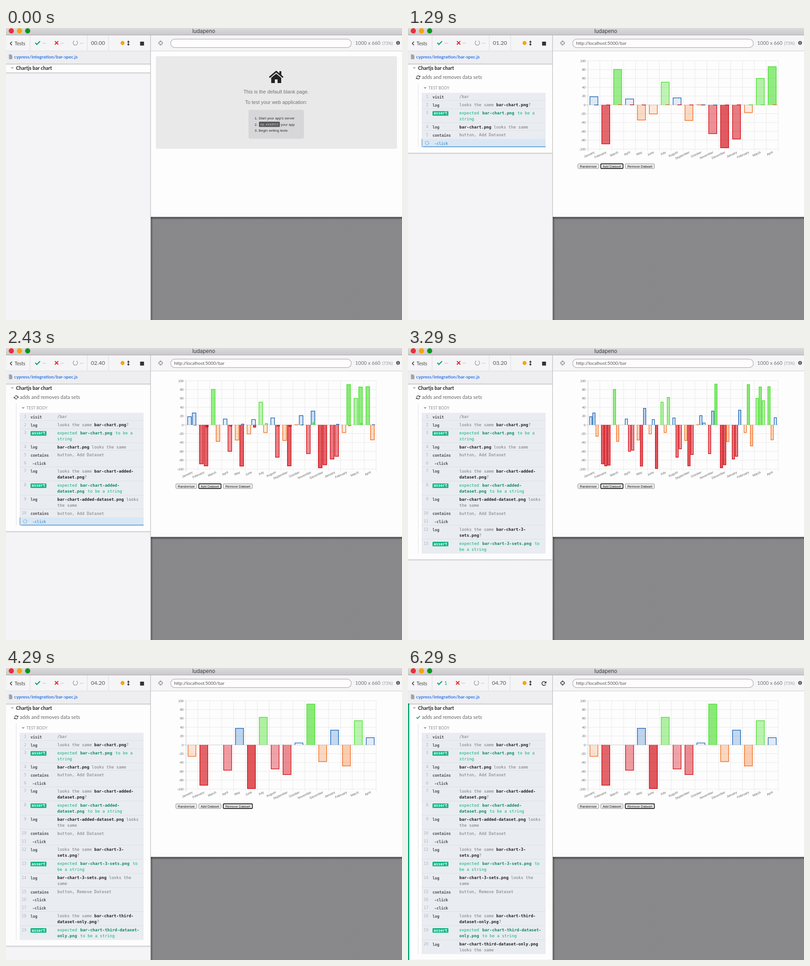
An HTML page with a canvas for the animation above (6.44 s loop, 872 by 642 pixels).

```html
<!DOCTYPE html>
<html lang="en">
<head>
<meta charset="utf-8">
<title>Test runner</title>
<style>
html, body { margin: 0; width: 100%; height: 100%; overflow: hidden; background: #f4f3f5; }
canvas { display: block; }
</style>
</head>
<body>
<canvas id="stage" width="872" height="642"></canvas>
<script>
const ctx = document.getElementById('stage').getContext('2d');
const LOOP = 6440, FPS = 7, LAST_FRAME = 44;
const LOADED = 100, FINISHED = 4750, TIMER_END = 4700;
const UI = 'Lato, sans-serif', SANS = '"Liberation Sans", sans-serif', MONO = '"DejaVu Sans Mono", monospace';
const GREEN = '#08b07c', BLUE = '#5a9bd4', WHITE = '#fefdfe';

// ---- data ----
// time, command, message: | breaks the line, * toggles bold
const ROWS = [
  [LOADED, 'visit', '/bar'],
  [270, 'log', 'looks the same *bar-chart.png*?'],
  [270, 'assert', 'expected *bar-chart.png* to be a|string'],
  [1270, 'log', '*bar-chart.png* looks the same'],
  [1270, 'contains', 'button, Add Dataset'],
  [1280, '-click', ''],
  [1400, 'log', 'looks the same *bar-chart-added-*|*dataset.png*?'],
  [1400, 'assert', 'expected *bar-chart-added-*|*dataset.png* to be a string'],
  [2400, 'log', '*bar-chart-added-dataset.png* looks|the same'],
  [2400, 'contains', 'button, Add Dataset'],
  [2410, '-click', ''],
  [2540, 'log', 'looks the same *bar-chart-3-*|*sets.png*?'],
  [2540, 'assert', 'expected *bar-chart-3-sets.png* to|be a string'],
  [3550, 'log', '*bar-chart-3-sets.png* looks the|same'],
  [3550, 'contains', 'button, Remove Dataset'],
  [3550, '-click', ''],
  [3640, '-click', ''],
  [3780, 'log', 'looks the same *bar-chart-third-*|*dataset-only.png*?'],
  [3780, 'assert', 'expected *bar-chart-third-dataset-*|*only.png* to be a string'],
  [4700, 'log', '*bar-chart-third-dataset-only.png*|looks the same'],
];
const SETS = [
  [19, -89, 81, 14, -35, -21, 52, 16.5, -36, -.4, -66, -98, -78, -18, 60.5, 87],
  [27.5, -93.5, -38, -60.5, -94, 12.5, -18, -74, -93.5, 21.5, 32, -91, -72, 92, 86.5, -34.5],
  [-26.5, -92, 0, -58, 38, -99.5, 63, -55, -68, 5, 93, -38.5, 34, -48.5, 55.5, 17],
];
const PHASES = [
  { at: LOADED, sets: [0] },
  { at: 1288, sets: [0, 1] },
  { at: 2415, sets: [0, 1, 2] },
  { at: 3560, sets: [1, 2] },
  { at: 3645, sets: [2] },
];
const MONTHS = ['January', 'February', 'March', 'April', 'May', 'June', 'July', 'August',
  'September', 'October', 'November', 'December'];

// ---- drawing helpers ----
function rect(x, y, w, h, color) {
  ctx.fillStyle = color;
  ctx.fillRect(x, y, w, h);
}
function text(s, x, y, font, color, align = 'left') {
  ctx.font = font;
  ctx.fillStyle = color;
  ctx.textAlign = align;
  ctx.fillText(s, x, y);
}
function fill(d, color) {
  ctx.fillStyle = color;
  ctx.fill(new Path2D(d));
}
function stroke(d, color, width) {
  ctx.strokeStyle = color;
  ctx.lineWidth = width;
  ctx.stroke(new Path2D(d));
}
function disc(x, y, r, color) {
  ctx.fillStyle = color;
  ctx.beginPath();
  ctx.arc(x, y, r, 0, 2 * Math.PI);
  ctx.fill();
}
function arc(x, y, r, from, to, color, width) {
  ctx.strokeStyle = color;
  ctx.lineWidth = width;
  ctx.beginPath();
  ctx.arc(x, y, r, from, to);
  ctx.stroke();
}
function roundBox(x, y, w, h, r, color, border, width = 1) {
  ctx.beginPath();
  ctx.roundRect(x, y, w, h, r);
  ctx.fillStyle = color;
  ctx.fill();
  if (!border) return;
  ctx.strokeStyle = border;
  ctx.lineWidth = width;
  ctx.stroke();
}
function shade(x, y, w, h, alpha, vertical) {
  const g = vertical ? ctx.createLinearGradient(0, y, 0, y + h) : ctx.createLinearGradient(x, 0, x + w, 0);
  g.addColorStop(0, `rgba(0,0,0,${alpha})`);
  g.addColorStop(1, 'rgba(0,0,0,0)');
  rect(x, y, w, h, g);
}
function at(x, y, angle, draw) {
  ctx.save();
  ctx.translate(x, y);
  ctx.rotate(angle);
  draw();
  ctx.restore();
}
const check = (x, y, s) => stroke(`M${x} ${y}l${3.5 * s} ${3.5 * s}l${7 * s} ${-7 * s}`, '#08a573', 2.3 * s);

const stripes = (() => {
  const tile = document.createElement('canvas');
  tile.width = tile.height = 4;
  const c = tile.getContext('2d');
  c.fillStyle = '#8c8b8d';
  c.fillRect(0, 0, 4, 4);
  c.fillStyle = '#7e7d7f';
  for (let i = 0; i < 4; i++) c.fillRect(i, 3 - i, 1, 1);
  return ctx.createPattern(tile, 'repeat');
})();

// ---- window and toolbar ----
function drawToolbar(t, done) {
  const bar = ctx.createLinearGradient(0, 0, 0, 15);
  bar.addColorStop(0, '#dcdadc');
  bar.addColorStop(1, '#cbc9cb');
  rect(0, 0, 872, 15, bar);
  rect(0, 15, 872, 1, '#aaa8aa');
  ['#ee2d36', '#f5a405', '#0d9422'].forEach((c, i) => disc(11.7 + 18 * i, 6.2, 5.7, c));
  text('ludapeno', 435.5, 11, '11.5px Inter, sans-serif', '#3a3a3c', 'center');

  rect(0, 16, 872, 35, '#f5f4f6');
  rect(319, 50, 553, 1.3, '#cdcccf');
  const shift = done ? -2 : 0;
  [53, 179 + shift, 226 + shift / 2].forEach(x => rect(x - .5, 16, 1, 35, '#d9d8da'));
  stroke('M13 30l-3.5 4l3.5 4', '#333', 1.6);
  text('Tests', 19, 37.5, `10.5px ${UI}`, '#444');
  check(64.5, 32.5, 1);
  text(done ? '1' : '--', 80, 37, `11px ${UI}`, done ? '#08a573' : '#999');
  stroke(`M${107.7 + shift} 29l7.4 7.4m0 -7.4l-7.4 7.4`, '#e0322f', 2.2);
  text('--', 119.5 + shift, 37, `11px ${UI}`, '#e58a88');
  arc(152.7 + shift, 32.7, 5, -1.1, 4.2, '#999', 1.3);
  text('--', 162.5 + shift, 37, `11px ${UI}`, '#aaa');
  const tenths = Math.floor(Math.min(t, TIMER_END) / 100);
  text((tenths / 10).toFixed(2).padStart(5, '0'), 187 + shift, 37.3, `12.1px ${UI}`, '#555');
  disc(256.6, 33, 4.4, '#f5a50f');
  stroke('M269.5 30v7', '#333', 1.6);
  fill('M269.5 27.5l3 3.7h-6zM269.5 39l3 -3.7h-6z', '#333');
  if (done) {
    arc(299.3, 34, 4.3, .5, 5.4, '#333', 1.6);
    fill('M304.7 28.7v5h-5z', '#333');
  } else {
    rect(295.3, 30, 8.6, 8.6, '#333');
  }

  const aim = done ? '#333' : '#888';
  arc(340.4, 33, 3.9, 0, 7, aim, 1.2);
  stroke('M340.4 27.5v4m0 3v4M335 33h4m3 0h4', aim, 1.2);
  roundBox(362.5, 24.5, 398, 18.5, 9.2, WHITE, '#bbb9bc', 1.4);
  if (t >= LOADED) text('http://localhost:5000/bar', 370, 37.3, `10px ${UI}`, '#555');
  text('1000 x 660', 769, 36.5, `10.95px ${UI}`, '#777');
  text('(73%)', 828.5, 36.5, `9.2px ${UI}`, '#999');
  disc(863.3, 32.7, 4.2, '#555');
  rect(862.7, 32, 1.3, 3.2, WHITE);
  rect(862.7, 30, 1.3, 1.2, WHITE);
}

// ---- command log ----
function drawMessage(message, x0, y, isAssert) {
  const [plain, strong] = isAssert ? [GREEN, '#0a8a62'] : ['#777', '#222'];
  const pad = isAssert ? 1.7 : 0;
  message.split('|').forEach((line, n) => {
    let x = x0;
    line.split('*').forEach((part, i) => {
      if (!part) return;
      const bold = i % 2;
      if (bold && x > x0) x += pad;
      text(part, x, y + 13.4 * n, `${bold ? 'bold ' : ''}9px ${MONO}`, bold ? strong : plain);
      x += ctx.measureText(part).width + (bold ? pad : 0);
    });
  });
}
function drawRow([time, cmd, message], i, y, h, t) {
  const isClick = cmd === '-click', isAssert = cmd === 'assert';
  const pending = isClick && t < time + 90;
  rect(30, y, 273, h, pending ? '#d9e7f4' : '#e9ecf0');
  if (i && !isClick) rect(30, Math.round(y) - 1, 273, 1, '#dce0e4');
  if (pending) {
    rect(30, y, 1.3, h, BLUE);
    rect(33, y + h - 1.5, 270, 1.8, BLUE);
    ctx.setLineDash([1.6, 1.6]);
    arc(42, y + 8.8, 3.8, t / 200, t / 200 + 6.3, BLUE, 1.5);
    ctx.setLineDash([]);
  } else {
    text(i + 1, 45, y + 11.6, `9px ${MONO}`, '#b4b8be', 'right');
  }
  if (isAssert) roundBox(54, y + 5, 35, 10, 1.5, '#0bb682');
  const x = isAssert ? 56.5 : isClick ? 58 : 54;
  text(cmd, x, y + 12.6, `bold 8.35px ${MONO}`, isAssert ? WHITE : pending ? BLUE : '#4c4c50');
  drawMessage(message, 113, y + 11.8, isAssert);
}
function drawSpinner(x, y, angle) {
  at(x, y, angle, () => {
    for (let i = 0; i < 2; i++) {
      arc(0, 0, 3.5, Math.PI + .3, 2 * Math.PI - .6, '#444', 1.3);
      fill('M4.7 -4.3v3.7h-3.7z', '#444');
      ctx.rotate(Math.PI);
    }
  });
}
function drawReporter(t, done) {
  rect(0, 51, 318, 591, '#f4f3f5');
  const visible = ROWS.filter(row => t >= row[0]);
  const heights = visible.map(row => row[2].includes('|') ? 31 : 17.65);
  const bottom = heights.reduce((a, b) => a + b, 142.5);
  const panelEnd = visible.length ? bottom + 13.3 : 98.3;
  rect(0, 78, 318, panelEnd - 78, WHITE);
  rect(0, panelEnd - .5, 318, 1.3, '#c2c1c4');
  shade(0, panelEnd + .8, 318, 3, .06, true);

  fill('M10.5 86h6.6l-3.3 4.2z', '#b4b3b6');
  text('Chartjs bar chart', 22, 91.5, `bold 10.7px ${UI}`, '#222');
  if (visible.length) {
    if (done) check(18.5, 108.3, .75);
    else drawSpinner(22.4, 108.5, (t - 3290) / 2000 * 2 * Math.PI);
    text('adds and removes data sets', 30.5, 112, `11px ${UI}`, '#666');
    rect(22, 122, 1, bottom - 122, '#e0e0e3');
    fill('M34.5 130h6.6l-3.3 4.2z', '#a5a4a8');
    text('TEST BODY', 45, 135.3, `8.7px ${UI}`, '#8c8b90');
  }
  let y = 142.5;
  visible.forEach((row, i) => {
    drawRow(row, i, y, heights[i], t);
    y += heights[i];
  });
  if (done) rect(0, 78, 2.8, 564, '#08a978');

  rect(0, 51, 318, 27, '#eeeef0');
  rect(0, 50, 318, 1, '#dddce0');
  shade(0, 78, 318, 4, .22, true);
  fill('M6.5 58h4.5l3 3v7.5h-7.5z', '#a2a1a4');
  text('cypress/integration/bar-spec.js', 17.8, 67, `bold 10.05px ${UI}`, '#2f76ec');
}

// ---- page under test ----
function drawBlankPage() {
  roundBox(330, 62, 531, 203.5, 3, '#e9e9ea');
  stroke('M580 108.5l15 -12.7l15 12.7', '#242426', 3);
  fill('M584 109.5l11 -9l11 9v11.5h-8v-8h-6v8h-8zM602 95h4.3v9l-4.3 -3.5z', '#242426');
  text('This is the default blank page.', 595, 143.5, `10.85px ${SANS}`, '#727274', 'center');
  text('To test your web application:', 595, 167.3, `10.85px ${SANS}`, '#727274', 'center');
  roundBox(534, 180, 122, 63.5, 4, '#d7d6d8');
  const font = `7.9px ${SANS}`;
  text("1. Start your app's server", 547.5, 201.2, font, '#333');
  text('2.', 547.5, 214.5, font, '#333');
  roundBox(557, 206, 46, 11.5, 1.5, '#58575a');
  text('cy.visit()', 560, 214.2, `6.7px ${MONO}`, WHITE);
  text('your app', 605, 214.5, font, '#333');
  text('3. Begin writing tests', 547.5, 227.8, font, '#333');
}

const LEFT = 396.3, ZERO = 169, UNIT = .97, COLUMN = 26.17;
const easeOutQuart = x => 1 - (1 - Math.min(1, Math.max(0, x))) ** 4;
const barColor = v => v < -50 ? [210, 5, 14] : v < 0 ? [240, 99, 10] : v < 50 ? [3, 88, 182] : [68, 222, 40];

// Each phase starts from wherever the previous one had brought the bars.
function barShape(set, phase, t) {
  const { at: start, sets } = PHASES[phase];
  const slot = sets.indexOf(set), size = COLUMN * .8 / sets.length;
  const goal = { x: COLUMN * .1 + size * (slot + .05), w: size * .9, grow: 1 };
  const known = phase > 0 && PHASES[phase - 1].sets.includes(set);
  const from = known ? barShape(set, phase - 1, start) : { ...goal, grow: 0 };
  const e = easeOutQuart((t - start) / 1000);
  const mix = key => from[key] + (goal[key] - from[key]) * e;
  return { x: mix('x'), w: mix('w'), grow: mix('grow') };
}
function drawBar(x, w, v, grow) {
  const rgb = barColor(v).join(), h = -v * UNIT * grow, side = Math.sign(h) * .6;
  rect(x, ZERO, w, h, `rgba(${rgb},${Math.abs(v / 150)})`);
  if (Math.abs(h) < .1) return;
  stroke(`M${x + .6} ${ZERO}v${h - side}h${w - 1.2}v${side - h}`, `rgb(${rgb})`, 1.25);
}
function drawButton(label, x, w, focused) {
  roundBox(x + .5, 298.7, w - 1, 10.2, 1.5, '#efefef', focused ? '#111' : '#7c7c7e', focused ? 1.7 : .9);
  text(label, x + w / 2, 306.5, `7.4px ${SANS}`, '#111', 'center');
}
function drawChart(t) {
  const font = `7px ${SANS}`;
  for (let v = -100; v <= 100; v += 20) {
    const y = ZERO - v * UNIT;
    rect(LEFT - 5, y - .4, 16 * COLUMN + 5, .9, v ? '#e6e6e7' : '#c4c4c6');
    text(v, 391, y + 2.5, font, '#666', 'right');
  }
  for (let i = 0; i <= 16; i++) {
    const x = LEFT + i * COLUMN;
    rect(x - .4, 72, .9, 199, i ? '#e6e6e7' : '#c4c4c6');
    if (i < 16) at(x + COLUMN / 2 + .8, 272.5, -.44, () => text(MONTHS[i % 12], 0, 2.5, font, '#666', 'right'));
  }
  const phase = PHASES.findLastIndex(p => t >= p.at);
  for (const set of PHASES[phase].sets) {
    const { x, w, grow } = barShape(set, phase, t);
    SETS[set].forEach((v, i) => drawBar(LEFT + i * COLUMN + x, w, v, grow));
  }
  drawButton('Randomize', 373.5, 47, false);
  drawButton('Add Dataset', 424, 50, phase === 1 || phase === 2);
  drawButton('Remove Dataset', 478, 65, phase > 2);
}
function drawPage(t) {
  rect(319, 51, 553, 365, WHITE);
  rect(319, 415.5, 553, 226.5, stripes);
  shade(319, 415.5, 553, 6, .5, true);
  shade(319, 415.5, 5, 226.5, .35);
  if (t < LOADED) drawBlankPage();
  else drawChart(t);
  rect(317.8, 16, 1.2, 626, '#bdbcbf');
}

function render(now) {
  const frame = Math.min(LAST_FRAME, Math.floor((now % LOOP + 5) * FPS / 1000));
  const t = Math.round(frame * 100 / FPS) * 10, done = t >= FINISHED;
  drawToolbar(t, done);
  drawReporter(t, done);
  drawPage(t);
}
let began;
function tick(now) {
  began ??= now;
  render(now - began);
  requestAnimationFrame(tick);
}
requestAnimationFrame(tick);
</script>
</body>
</html>
```
